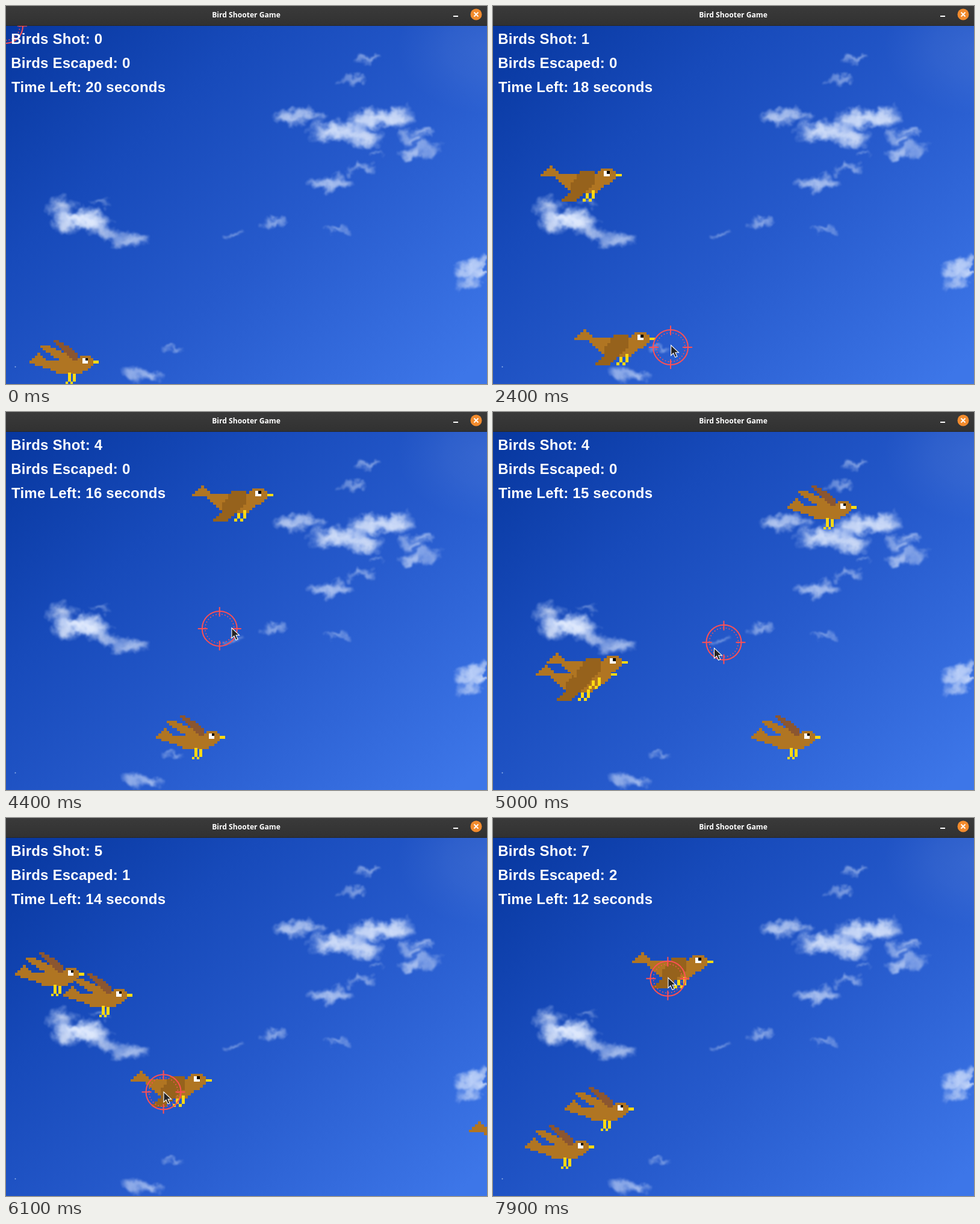
An HTML page that plays this animation: 799x628 px, repeating every 8000 ms.

```html
<!DOCTYPE html>
<html lang="en">
<head>
<meta charset="utf-8">
<title>Bird Shooter Game</title>
<style>
html, body { margin: 0; width: 100%; height: 100%; overflow: hidden; background: #2054c4; }
svg { position: absolute; left: 0; top: 0; display: block; }
.score { font: bold 24px "Liberation Sans", Arial, sans-serif; letter-spacing: .22px; fill: #fff; }
.title { font: bold 12.1px "Open Sans", "Noto Sans", sans-serif; fill: #fff; text-anchor: middle; }
</style>
</head>
<body>
<svg width="799" height="628" viewBox="0 0 799 628">
  <defs>
    <linearGradient id="sky" gradientUnits="userSpaceOnUse" x1="40" y1="0" x2="680" y2="690">
      <stop offset="0" stop-color="#07379f"/>
      <stop offset=".3" stop-color="#174aba"/>
      <stop offset=".6" stop-color="#265acc"/>
      <stop offset="1" stop-color="#3d76e8"/>
    </linearGradient>
    <radialGradient id="puff">
      <stop offset="0" stop-color="#f4f8ff"/>
      <stop offset=".45" stop-color="#e6efff" stop-opacity=".7"/>
      <stop offset="1" stop-color="#b9d0ff" stop-opacity="0"/>
    </radialGradient>
    <filter id="wisp" filterUnits="userSpaceOnUse" x="0" y="0" width="799" height="628" color-interpolation-filters="sRGB">
      <feTurbulence type="fractalNoise" baseFrequency=".05" numOctaves="4" seed="7"/>
      <feDisplacementMap in="SourceGraphic" scale="26" xChannelSelector="R" yChannelSelector="G"/>
      <feGaussianBlur stdDeviation="1"/>
    </filter>
  </defs>
  <rect width="799" height="628" fill="url(#sky)"/>
  <ellipse cx="799" cy="70" rx="150" ry="110" fill="url(#puff)" opacity=".08"/>
  <g id="clouds" filter="url(#wisp)"></g>
  <circle cx="15.5" cy="599.5" r="1" fill="#9bb8ee"/>
</svg>

<svg width="799" height="628" viewBox="0 0 799 628">
  <defs>
    <g id="wingsUp" transform="scale(4.42 4.29)" shape-rendering="crispEdges"></g>
    <g id="wingsDown" transform="scale(5 4.6)" shape-rendering="crispEdges"></g>
    <linearGradient id="bar" x2="0" y2="1">
      <stop offset="0" stop-color="#3a3a3a"/>
      <stop offset="1" stop-color="#313131"/>
    </linearGradient>
  </defs>
  <g id="flock"></g>
  <g id="sight" fill="none" stroke="#ff5054" stroke-width="2">
    <circle r="29"/>
    <circle r="24" stroke-width="1.6" stroke-dasharray="1.7 3.33"/>
    <path d="M0-36v16M0 20v16M-36 0h16M20 0h16"/>
  </g>
  <path id="pointer" d="M0 0V17l4-3.8 3 6.8 3.2-1.4-3-6.5h5.6z" fill="#242424" stroke="#fff" stroke-width="1.1"/>
  <g class="score">
    <text id="shot" x="8.2" y="63"></text>
    <text id="escaped" x="8.2" y="103"></text>
    <text id="left" x="9" y="143"></text>
  </g>
  <rect width="799" height="33" fill="url(#bar)"/>
  <rect y="32" width="799" height="1" fill="#262626"/>
  <text class="title" x="399" y="18.6">Bird Shooter Game</text>
  <rect x="743" y="16" width="8" height="2" fill="#fff"/>
  <circle cx="781" cy="14" r="9.5" fill="#f28b2d"/>
  <path d="M777.5 10.5l7 7m0-7l-7 7" stroke="#fff" stroke-width="1.8"/>
</svg>

<script>
const $ = id => document.getElementById(id);
const SVG = "http://www.w3.org/2000/svg";
const LOOP = 8000;

function add(parent, tag, attrs = {}) {
  const el = parent.appendChild(document.createElementNS(SVG, tag));
  for (const key in attrs) el.setAttribute(key, attrs[key]);
  return el;
}

let seed = 5;
const random = () => (seed = seed * 16807 % 2147483647) / 2147483647;

// A bank of soft puffs: longer banks are denser, and the tilt turns from left to right
function cloud(x, y, length) {
  const bank = add($("clouds"), "g", { transform: `translate(${x} ${y}) rotate(${18 - x / 22})` });
  const depth = length * .4, opacity = Math.min(.75, length / 75);
  for (let along = -.6; along <= .7; along += .3)
    add(bank, "ellipse", {
      cx: along * length, cy: (random() - .5) * depth, opacity, fill: "url(#puff)",
      rx: length * .5, ry: depth * (.6 + random() * .4)
    });
}

[
  [120, 352, 56], [130, 362, 50], [200, 389, 38], [160, 327, 18],
  [603, 90, 23], [574, 123, 22], [485, 181, 42], [622, 185, 54], [565, 213, 60],
  [680, 215, 32], [686, 240, 36], [612, 247, 16], [591, 270, 25], [539, 291, 38],
  [380, 378, 18], [447, 362, 24], [552, 372, 20],
  [783, 430, 40], [794, 448, 46], [280, 570, 20], [226, 611, 34]
].forEach(bank => cloud(...bank));

// Fills the cells of a unit grid whose centres lie inside a polygon
function pixels(sprite, fill, outline) {
  const points = outline.split(",").map(pair => pair.trim().split(" ").map(Number));
  let d = "";
  for (let row = 0; row < 17; row++) {
    const y = row + .5, cuts = [];
    points.forEach(([x0, y0], i) => {
      const [x1, y1] = points[(i + 1) % points.length];
      if (y0 <= y !== y1 <= y) cuts.push(Math.round(x0 + (x1 - x0) * (y - y0) / (y1 - y0)));
    });
    cuts.sort((a, b) => a - b);
    for (let i = 0; i < cuts.length; i += 2)
      d += `M${cuts[i]} ${row}H${cuts[i + 1]}v1H${cuts[i]}z`;
  }
  add(sprite, "path", { fill, d });
}

const BODY = "#b07522", YELLOW = "#fbd914";

function eyeAndBeak(sprite, x, y) {
  add(sprite, "path", { fill: "#fff", d: `M${x} ${y}h2v2h-2z` });
  add(sprite, "path", { d: `M${x + 1} ${y}h1v1h-1z` });
  add(sprite, "path", { fill: YELLOW, d: `M${x + 4} ${y + 1}h2v1h-2z` });
}

function leg(sprite, x, top, foot) {
  add(sprite, "path", { fill: YELLOW, d: `M${x} ${top}h1V${foot}h-1zM${x - 1} ${foot}h1v1h-1z` });
}

const up = $("wingsUp"), down = $("wingsDown");
pixels(up, BODY, "4 2, 7.5 2, 18 8, 11.5 8, 4 3");
pixels(up, BODY, "3.5 4.9, 6.5 8, 18 8, 19 6, 22.9 6, 24 7, 24 10, 19 13, 11 13, 4 10, 0 9, 0 8");
pixels(up, "#8b5630", "9 0, 10 0, 15 2.5, 18 6, 18 8, 16 8, 9 1");
eyeAndBeak(up, 20, 7);
leg(up, 14.5, 12.6, 16);
leg(up, 16.4, 13, 16);

pixels(down, BODY, "3.5 -.1, 6 2.9, 18.5 3, 20 1, 23.9 1, 25 2, 25 5, 20 8, 18 10, 11 10, 4 4, 0 4, 0 3");
pixels(down, "#96621c", "13 2, 18 2, 18 6, 12 13, 6.9 13, 10 10, 10 7");
eyeAndBeak(down, 21, 2);
leg(down, 15, 10, 12);
leg(down, 17, 9, 12);

// Birds in order of birth: tick of birth, speed per tick, top edge, time shot
const birds = [
  [-5, 8, 555, 1200], [56, 8, 537, 3200], [63, 8, 265, 3400], [90, 8, 330, 4300],
  [103, 10, 122], [109, 10, 504], [134, 4, 420, 6200], [137, 6, 400, 5900],
  [162, 4, 258, 7300], [182, 4, 223], [220, 6, 447], [231, 6, 510]
].map(([born, speed, y, shotAt = Infinity]) =>
  ({ born, speed, y, shotAt, el: add($("flock"), "use") }));

// Resting points of the aim: time, x, y
const stops = [
  [200, -1, 33], [400, 427, 470], [1000, 356, 573], [1700, 371, 568], [2400, 295, 567],
  [3300, 345, 300], [4200, 315, 362], [4700, 428, 356], [5600, 256, 459], [6200, 262, 455],
  [6700, 429, 409], [7300, 280, 295], [LOOP, 291, 265]
];

function aimAt(t) {
  const next = Math.max(1, stops.findIndex(stop => stop[0] > t));
  const [t0, x0, y0] = stops[next - 1], [t1, x1, y1] = stops[next];
  const k = Math.max(0, (t - t0) / (t1 - t0));
  const ease = k * k * (3 - 2 * k);
  return [x0 + (x1 - x0) * ease, y0 + (y1 - y0) * ease];
}

const place = (el, x, y) => el.setAttribute("transform", `translate(${x} ${y})`);
const show = (el, on) => el.setAttribute("visibility", on ? "visible" : "hidden");

function draw(time) {
  let t = Math.floor(time % LOOP / 100) * 100;
  // The picture stalls here while the game runs on
  if (t > 2400 && t < 3200) t = 2400;
  const tick = Math.floor(t * .0304 + .58);
  let shot = 0, escaped = 0;

  for (const { born, speed, y, shotAt, el } of birds) {
    const age = tick - born;
    const hit = t >= shotAt, gone = !hit && age * speed >= 800;
    shot += hit;
    escaped += gone;
    show(el, age > 0 && !hit && !gone);
    el.setAttribute("href", Math.floor(age / 10) % 2 ? "#wingsDown" : "#wingsUp");
    place(el, age * speed - 1, y);
  }

  place($("sight"), ...aimAt(t));
  // The pointer runs slightly ahead of the sight
  place($("pointer"), ...aimAt(t + 60));
  show($("pointer"), t > 200);

  $("shot").textContent = `Birds Shot: ${shot}`;
  $("escaped").textContent = `Birds Escaped: ${escaped}`;
  $("left").textContent = `Time Left: ${20 - Math.floor((t + 100) / 1000)} seconds`;
}

const start = performance.now();
function frame() {
  draw(performance.now() - start);
  requestAnimationFrame(frame);
}
frame();
</script>
</body>
</html>
```
